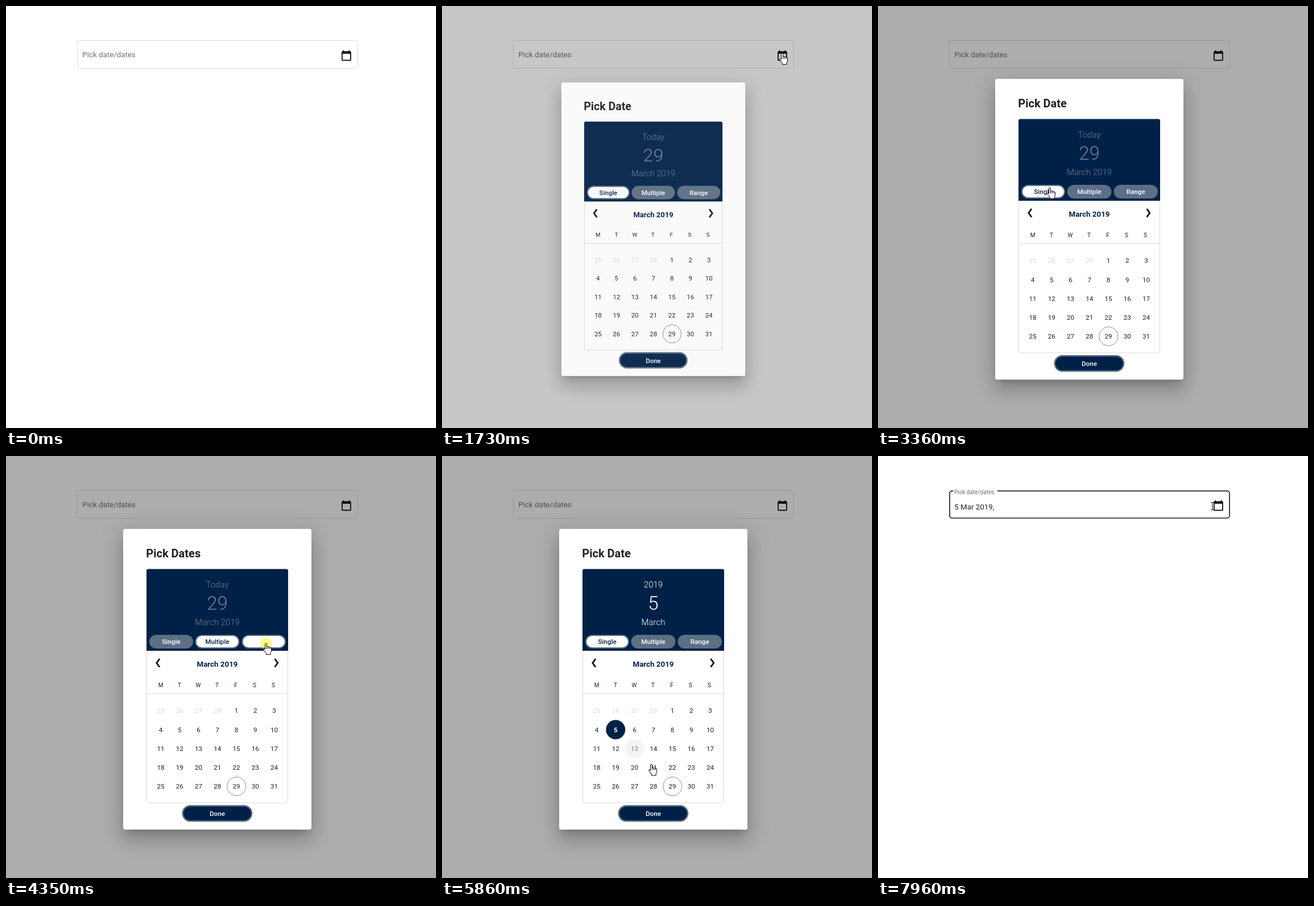
These frames come from a looping animation (756x741 px, 7990 ms). An HTML page with a canvas:

```html
<!DOCTYPE html>
<html>
<head>
<meta charset="utf-8">
<title>Date picker</title>
<style>
html, body { margin: 0; width: 100%; height: 100%; overflow: hidden; background: #fff; }
canvas { display: block; }
</style>
</head>
<body>
<canvas id="stage" width="756" height="741"></canvas>
<script>
const W = 756, H = 741, LOOP = 7990;
const NAVY = '#002147', STEEL = '#5c6f84', INK = '#212121';
const OPEN = 1635, CLOSE = 6460, FILLED = 6535, PICKED = 5600;
const MODES = [[0, 0], [3870, 1], [4390, 2], [4860, 0]];
const PRESSES = [[1500, 1620], [3780, 3870], [4270, 4390], [4770, 4860], [5490, 5600], [6310, 6440]];
const BUTTONS = [['Single', 252, 77], ['Multiple', 332.5, 78], ['Range', 414.5, 77.5]];

const stage = document.getElementById('stage').getContext('2d');
const layer = Object.assign(document.createElement('canvas'), { width: W, height: H }).getContext('2d');
let c = stage;

const clamp = v => Math.max(0, Math.min(1, v));
const ramp = (t, start, length) => clamp((t - start) / length);
const mix = (a, b, u) => a + (b - a) * u;

function bezier(x1, y1, x2, y2) {
  const at = (a, b, s) => 3 * s * (1 - s) ** 2 * a + 3 * s * s * (1 - s) * b + s ** 3;
  return x => {
    let lo = 0, hi = 1;
    for (let i = 0; i < 24; i++) {
      const mid = (lo + hi) / 2;
      if (at(x1, x2, mid) < x) lo = mid; else hi = mid;
    }
    return x >= 1 ? 1 : at(y1, y2, lo);
  };
}
const swift = bezier(0.25, 0.8, 0.25, 1);
const enter = bezier(0, 0, 0.2, 1);
const leave = bezier(0.4, 0, 0.2, 1);

const smooth = u => u * u * (3 - 2 * u);
const easeIn = u => u * u;
const easeOut = u => 1 - (1 - u) ** 2;

// Cursor stops: time, x, y, easing towards that stop
const PATH = [
  [290, 645, 622], [1060, 598, 83], [1740, 598, 83], [2210, 363, 492], [2340, 363, 492],
  [2880, 302, 319], [3380, 302, 319], [3760, 372, 328], [3890, 372, 328], [4130, 457, 329],
  [4420, 457, 329], [4750, 302, 328], [4870, 302, 328], [4980, 304, 400, easeIn],
  [5280, 306, 484, easeOut], [5680, 306, 484], [5860, 368, 541, easeIn],
  [6230, 388, 617, easeOut], [7200, 388, 617], [7945, 588, 88]
];

function cursorAt(t) {
  const i = PATH.findIndex(stop => stop[0] > t);
  if (i < 1) return (i < 0 ? PATH[PATH.length - 1] : PATH[0]).slice(1, 3);
  const [t0, x0, y0] = PATH[i - 1], [t1, x1, y1, ease = smooth] = PATH[i];
  const u = ease((t - t0) / (t1 - t0));
  return [mix(x0, x1, u), mix(y0, y1, u)];
}

// y is the middle of the capital letters
function text(str, x, y, size, color, weight = 400, align = 'center') {
  c.font = `${weight} ${size}px Roboto, sans-serif`;
  c.textAlign = align;
  c.fillStyle = color;
  c.fillText(str, x, y + size * 0.355);
}

function box(x, y, w, h, r, fill, stroke, width = 1) {
  c.beginPath();
  c.roundRect(x, y, w, h, r);
  if (fill) { c.fillStyle = fill; c.fill(); }
  if (stroke) { c.strokeStyle = stroke; c.lineWidth = width; c.stroke(); }
}

function disc(x, y, r, fill, stroke) {
  c.beginPath();
  c.arc(x, y, r, 0, 7);
  if (fill) { c.fillStyle = fill; c.fill(); }
  if (stroke) { c.strokeStyle = stroke; c.lineWidth = 1; c.stroke(); }
}

const ICON = new Path2D('M20 3h-1V1h-2v2H7V1H5v2H4c-1.1 0-2 .9-2 2v16c0 1.1.9 2 2 2h16c1.1 0 2-.9 2-2V5c0-1.1-.9-2-2-2zm0 18H4V8h16z');

function drawField(t) {
  const filled = t >= FILLED;
  const float = swift(ramp(t, FILLED, 270));
  const hover = t > 7000 ? ramp(t, 7860, 80) : t < OPEN ? ramp(t, 1010, 150) : 0;
  const thick = mix(1, 1.7, hover), inset = mix(0.5, 1, hover);
  const l = 125 + inset, r = 619 - inset, top = 60 + inset + hover * 0.4, bottom = 110 - inset;
  c.beginPath();
  c.moveTo(filled ? mix(171, 210, float) : 171, top);
  c.arcTo(r, top, r, bottom, 4);
  c.arcTo(r, bottom, l, bottom, 4);
  c.arcTo(l, bottom, l, top, 4);
  c.arcTo(l, top, r, top, 4);
  c.lineTo(filled ? mix(171, 132.5, float) : 171, top);
  c.strokeStyle = `rgba(0,0,0,${mix(0.13, 0.87, hover)})`;
  c.lineWidth = thick;
  c.stroke();

  text('Pick date/dates', 134.3, mix(85.7, 63, float), mix(13.33, 10, float), 'rgba(0,0,0,.56)', 400, 'left');
  if (filled) text('5 Mar 2019,', 134.3, 89.3, 13.33, 'rgba(0,0,0,.87)', 400, 'left');

  c.save();
  c.translate(588.4, 77);
  c.scale(0.833, 0.833);
  c.fillStyle = '#000';
  c.fill(ICON);
  c.restore();
}

function shadow(scale, offset, blur, spread, alpha) {
  c.save();
  c.shadowColor = `rgba(0,0,0,${alpha})`;
  c.shadowBlur = blur * scale;
  c.shadowOffsetX = 2000;
  c.shadowOffsetY = offset * scale;
  box(206 - spread - 2000 / scale, 128 - spread, 331 + 2 * spread, 528 + 2 * spread, 4, '#000');
  c.restore();
}

function drawModes(t) {
  const current = MODES.filter(m => m[0] <= t).pop();
  const previous = MODES[MODES.indexOf(current) - 1];
  BUTTONS.forEach(([label, x, w], i) => {
    const selected = current[1] === i;
    const [px, py] = cursorAt(t);
    const pressed = PRESSES.some(([a, b]) => t >= a && t < b) && px > x && px < x + w && py > 314 && py < 338;
    box(x, 314, w, 24, 12, STEEL);
    const fading = previous && previous[1] === i ? 1 - ramp(t, current[0], 150) : 0;
    const white = selected || pressed ? 1 : fading;
    if (white) box(x + 2, 316, w - 4, 20, 10, `rgba(255,255,255,${white})`);
    text(label, x + w / 2, 326, 11.67, selected ? NAVY : '#fff', 500);
  });
}

function hoverLevel(t, x, y) {
  if (t < 5000) return 0;
  for (let lag = 60; lag < 160; lag += 10) {
    const [px, py] = cursorAt(t - lag);
    if (Math.hypot(px - x, py - y) < 16.5) return 1 - Math.max(0, lag - 100) / 60;
  }
  return 0;
}

function drawDays(t) {
  [...'MTWTFSS'].forEach((d, i) => text(d, 272 + 33 * i, 402, 10, NAVY));
  for (let i = 0; i < 35; i++) {
    const day = i < 4 ? 25 + i : i - 3;
    const x = 272 + 33.25 * (i % 7), y = 447.3 + 33.2 * Math.floor(i / 7);
    if (i < 4) { text(day, x, y, 11.67, '#d9d9d9'); continue; }
    if (day === 5 && t >= PICKED) {
      disc(x, y, 17, NAVY);
      text(day, x, y, 11.67, '#fff', 700);
      continue;
    }
    const hover = hoverLevel(t, x, y);
    if (hover) disc(x, y, 16.8, `rgba(244,244,244,${hover})`);
    if (day === 29) disc(x + 0.3, y, 16.5, null, '#8c8c8c');
    text(day, x, y, 11.67, hover > 0.3 ? '#858585' : '#12233b');
  }
}

function chevron(x, dir) {
  c.beginPath();
  c.moveTo(x + 3 * dir, 356);
  c.lineTo(x - 2.2 * dir, 363.3);
  c.lineTo(x + 3 * dir, 370.6);
  c.strokeStyle = '#161b22';
  c.lineWidth = 2.9;
  c.stroke();
}

function drawDialog(t, scale) {
  c.save();
  c.translate(371.5, 392);
  c.scale(scale, scale);
  c.translate(-371.5, -392);
  shadow(scale, 9, 12.5, -5.8, 0.2);
  shadow(scale, 20, 31.7, 2.5, 0.14);
  shadow(scale, 7.5, 38.3, 6.7, 0.12);
  box(206, 128, 331, 528, 3.5, '#fff');

  const single = MODES.filter(m => m[0] <= t).pop()[1] === 0;
  text(single ? 'Pick Date' : 'Pick Dates', 246.3, 171, 20, INK, 700, 'left');

  box(247.5, 199, 248, 410, 3, '#fff', '#d9d9d9');
  box(247, 198.5, 249, 143.5, [3, 3, 0, 0], NAVY);
  const picked = t >= PICKED;
  const head = picked ? ['2019', '5', 'March'] : ['Today', '29', 'March 2019'];
  const color = picked ? '#fff' : 'rgba(255,255,255,.42)';
  text(head[0], 371.5, 225.5, 15, color, 300);
  text(head[1], 371.5, 258.5, 33, color, 300);
  text(head[2], 371.5, 291.5, 15, color, 300);
  drawModes(t);

  chevron(267, 1);
  chevron(475.5, -1);
  text('March 2019', 371.5, 365.7, 13.33, NAVY, 700);
  c.fillStyle = '#dcdcdc';
  c.fillRect(248, 417, 247, 1);
  drawDays(t);

  box(310.7, 614.2, 121.3, 26.8, 13.4, NAVY, STEEL, 2.5);
  text('Done', 371.5, 628, 11.67, '#fff', 500);
  c.restore();
}

const HAND = new Path2D('M-1.5 11V1.5Q-1.5 0 0 0T1.5 1.5V6Q3 4.8 4.3 6.3Q6 5.4 7 7Q9.5 6.5 9.5 9V13Q9.3 15 8 16.5V19.5H.5V17.5L-4.2 11.5Q-4.8 9.2-3 9.3Z');
const KNUCKLES = new Path2D('M1.5 6V10M4.3 6.3V10M7 7V10');
const ARROW = new Path2D('M0 0V16L3.7 12.5L6.2 18.5L8.5 17.5L6 11.7H11.5Z');
const BEAM = new Path2D('M-3 -6.5H-.5L0 -6L.5 -6.5H3M0 -6V6M-3 6.5H-.5L0 6L.5 6.5H3');

function drawCursor(t) {
  if (t < 290) return;
  const [x, y] = cursorAt(t);
  if (PRESSES.some(([a, b]) => t >= a && t < b)) disc(x, y, 10, 'rgba(255,255,0,.5)');
  const overField = x > 125 && x < 619 && y > 60 && y < 110;
  const open = t >= OPEN && t < FILLED;
  c.save();
  c.translate(x, y);
  c.strokeStyle = '#000';
  c.fillStyle = '#fff';
  c.lineWidth = 1;
  if (overField && !open && t > 7000) {
    c.stroke(BEAM);
  } else if (open || overField) {
    c.fill(HAND);
    c.stroke(HAND);
    c.stroke(KNUCKLES);
  } else {
    c.fill(ARROW);
    c.stroke(ARROW);
  }
  c.restore();
}

function draw(t) {
  c = stage;
  c.fillStyle = '#fff';
  c.fillRect(0, 0, W, H);
  drawField(t);

  const shade = 0.32 * swift(ramp(t, OPEN, 400)) * (1 - swift(ramp(t, CLOSE, 400)));
  c.fillStyle = `rgba(0,0,0,${shade})`;
  c.fillRect(0, 0, W, H);

  const grow = enter(ramp(t, OPEN, 150));
  const alpha = grow * (1 - leave(ramp(t, CLOSE, 75)));
  if (alpha > 0) {
    c = layer;
    c.clearRect(0, 0, W, H);
    drawDialog(t, 0.7 + 0.3 * grow);
    c = stage;
    c.globalAlpha = alpha;
    c.drawImage(layer.canvas, 0, 0);
    c.globalAlpha = 1;
  }
  drawCursor(t);
}

const begin = performance.now();
function tick() {
  draw((performance.now() - begin) % LOOP);
  requestAnimationFrame(tick);
}
tick();
</script>
</body>
</html>
```
